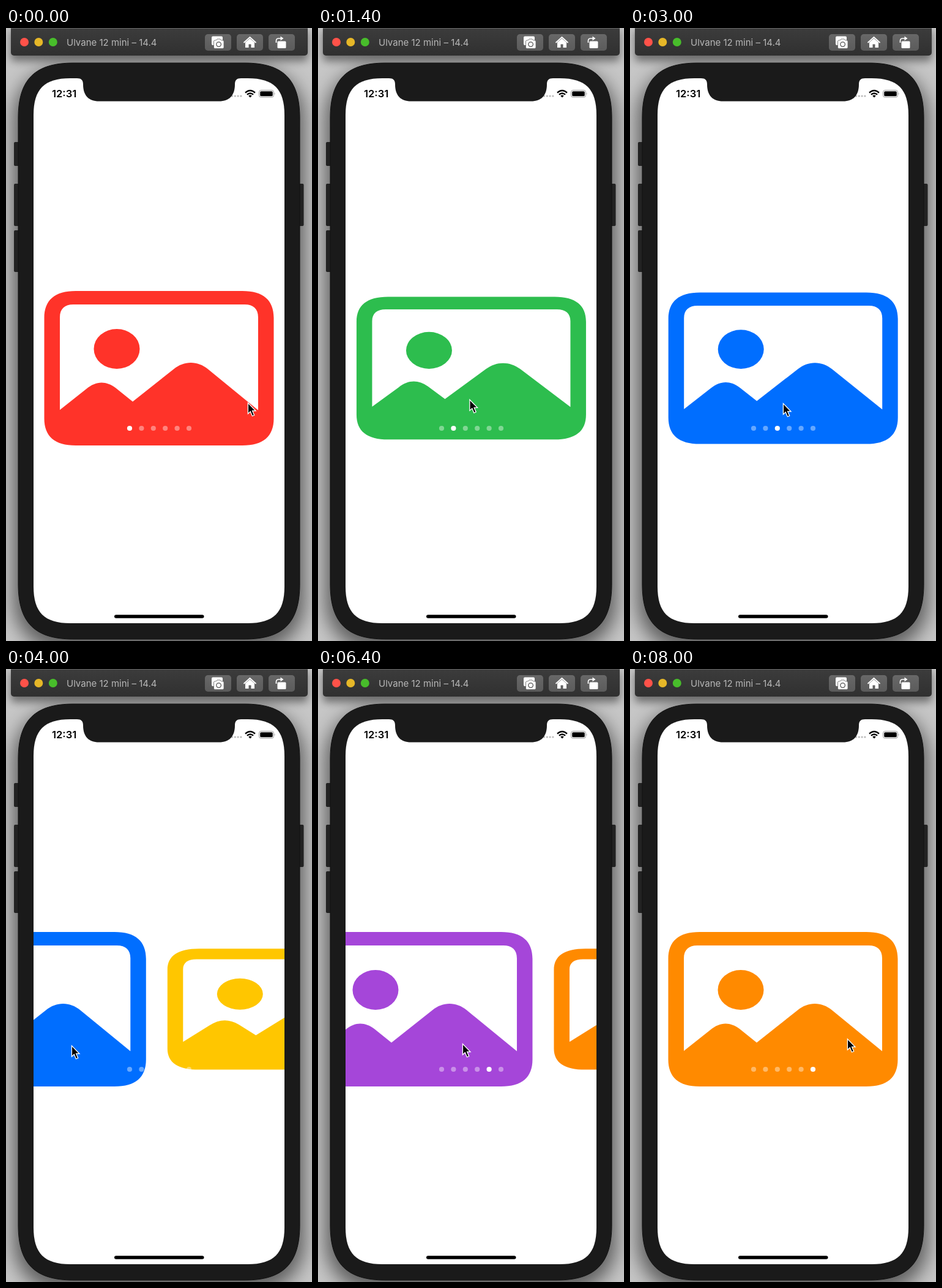
Animation, 500 px wide and 1000 px high, one loop 8200 ms. Source, as an HTML page:

```html
<!DOCTYPE html>
<html lang="en">
<head>
<meta charset="utf-8">
<title>Page carousel</title>
<style>
  html, body { margin: 0; width: 100%; height: 100%; overflow: hidden; background: #bebebe; }
  svg { display: block; width: 100vw; height: 100vh; }
  text { font-family: Inter, Roboto, sans-serif; }
</style>
</head>
<body>
<svg viewBox="0 0 500 1000" preserveAspectRatio="none">
  <defs>
    <linearGradient id="bar" x2="0" y2="1">
      <stop stop-color="#3e3e3e"/><stop offset="1" stop-color="#303030"/>
    </linearGradient>
    <linearGradient id="key" x2="0" y2="1">
      <stop stop-color="#686868"/><stop offset="1" stop-color="#5b5b5b"/>
    </linearGradient>
    <filter id="blur" x="-20%" y="-20%" width="140%" height="140%"><feGaussianBlur stdDeviation="15"/></filter>
    <filter id="soft" x="-20%" y="-60%" width="140%" height="220%"><feGaussianBlur stdDeviation="7"/></filter>
    <clipPath id="screen"><path d="M45 142C45 99.600 62.600 82 105 82H395C437.400 82 455 99.600 455 142V911C455 953.400 437.400 971 395 971H105C62.600 971 45 953.400 45 911Z"/></clipPath>
    <path id="picture" fill-rule="evenodd" d="M62.500 473C62.500 444 79.500 429 114 429H386C420.500 429 437.500 444 437.500 473V637C437.500 666 420.500 681 386 681H114C79.500 681 62.500 666 62.500 637Z
      M88 623L131 589C147 575.500 163 575 179 587L207 609.500L274 556.500C291 542.500 313 542.500 330 556.500L412 623.500V472C412 458 404 451 390 451H110C96 451 88 458 88 472Z
      M143.500 523.500a37.500 32.500 0 1 0 75 0a37.500 32.500 0 1 0 -75 0Z"/>
  </defs>

  <rect width="500" height="1000" fill="#c6c6c6"/>
  <rect x="12" y="66" width="476" height="950" rx="80" fill="#000" opacity=".52" filter="url(#blur)"/>
  <rect x="8" y="4" width="485" height="50" rx="6" fill="#000" opacity=".45" filter="url(#soft)"/>

  <!-- simulator toolbar -->
  <rect x="8" y="-8" width="485" height="53" rx="5" fill="url(#bar)"/>
  <path d="M8 .5H493" stroke="#666"/>
  <circle cx="30" cy="23" r="7" fill="#ff5249"/>
  <circle cx="53.300" cy="23" r="7" fill="#e6b728"/>
  <circle cx="76.800" cy="23" r="7" fill="#48bd2b"/>
  <text x="99" y="29" font-size="15" fill="#b7b7b7">Ulvane 12 mini – 14.4</text>
  <g fill="url(#key)">
    <rect x="325" y="10" width="43" height="27" rx="5"/>
    <rect x="377" y="10" width="43" height="27" rx="5"/>
    <rect x="429" y="10" width="43" height="27" rx="5"/>
  </g>
  <g fill="#fff">
    <path d="M336 15.500q0-2 2-2h14q2 0 2 2V20H341v8h-3q-2 0-2-2Z"/>
    <path d="M339.500 22q0-2 2-2h2l1.500-2h5l1.500 2h2.500q2 0 2 2v9.500q0 2-2 2h-12.500q-2 0-2-2Z" stroke="#626262" stroke-width=".8"/>
    <circle cx="347.600" cy="26.600" r="3.800" fill="none" stroke="#555" stroke-width="1.300"/>
    <path d="M391 23.500V32h5.500v-5.500h4V32h5.500v-8.500L398.500 17Z"/>
    <path d="M388.500 24L398.500 15L408.500 24" fill="none" stroke="#fff" stroke-width="1.700"/>
    <rect x="443.500" y="21.500" width="14" height="11.500" rx="1.500"/>
    <path d="M441.500 24v-3q0-4 4-4h4" fill="none" stroke="#fff" stroke-width="1.700"/>
    <path d="M448.500 13.500L453.500 17L448.500 20.500Z"/>
  </g>

  <!-- phone body -->
  <g fill="#222">
    <rect x="13" y="186" width="9" height="39" rx="2"/>
    <rect x="13" y="254" width="9" height="69" rx="2"/>
    <rect x="13" y="330" width="9" height="68" rx="2"/>
    <rect x="477" y="254" width="9.500" height="69" rx="2"/>
  </g>
  <path fill="#1a1a1a" stroke="#111" d="M20 147C20 84 47 57 110 57H390C453 57 480 84 480 147V907C480 970 453 997 390 997H110C47 997 20 970 20 907Z"/>

  <g clip-path="url(#screen)">
    <rect x="45" y="82" width="410" height="889" fill="#fff"/>
    <g id="pages"></g>
    <g id="dots" fill="#fff"></g>
    <text x="75" y="113" font-size="16.600" font-weight="600">12:31</text>
    <path d="M369.500 111H384.500" stroke="#b9b9b9" stroke-width="3.200" stroke-linecap="round" stroke-dasharray="0 4.800"/>
    <g fill="none" stroke="#000" stroke-width="2.300">
      <path d="M391 105.600Q399 98.500 407 105.600"/>
      <path d="M393.900 108.700Q399 104.200 404.100 108.700"/>
    </g>
    <path d="M396.200 110.600Q399 108.200 401.800 110.600L399 113.400Z"/>
    <rect x="413.500" y="101.500" width="24" height="11.500" rx="3.300" fill="none" stroke="#999"/>
    <rect x="415.200" y="103.200" width="20.600" height="8.100" rx="1.900"/>
    <path d="M438.800 105.500q1.800 1.700 0 3.500Z" fill="#999"/>
    <rect x="177" y="957.200" width="146.500" height="5.600" rx="2.800"/>
  </g>
  <path fill="#1a1a1a" d="M116 80V82C123 82 126 85 126 92C126 110 135 119.500 152 119.500H348C365 119.500 374 110 374 92C374 85 377 82 384 82V80Z"/>
  <path id="cursor" stroke="#fff" stroke-width="1.300" d="M.4.6V18.300L4.300 14.700L7.400 22L10.700 20.700L7.600 13.500H13Z"/>
</svg>
<script>
const LOOP = 8200, STEP = 200, PAGE_WIDTH = 410, SMALL = 0.783, MIDDLE = 554.7;
const COLORS = ['#ff3329', '#2dbd4e', '#006eff', '#ffc600', '#a546d9', '#ff8a00'];
const SWIPE_STARTS = [400, 1946, 3661, 4996, 6199];
const SETTLE = 850, GROW = 250;

// Pointer path: time, x, y
const POINTER = [
  [0, 395, 611], [400, 360, 606], [800, 97, 598], [1200, 200, 604], [1750, 358, 610],
  [1950, 355, 610], [2200, 223, 611], [2450, 80, 612], [3000, 250, 612], [3500, 325, 614],
  [3660, 318, 614], [4000, 107, 614], [4150, 70, 616], [4700, 320, 620], [5000, 330, 620],
  [5200, 243, 618], [5450, 80, 612], [6000, 320, 610], [6200, 322, 611], [6400, 236, 611],
  [6650, 75, 606], [7300, 340, 602], [8000, 355, 603]
];

const byId = id => document.getElementById(id);
const clamp = v => Math.max(0, Math.min(1, v));
const smooth = v => v * v * (3 - 2 * v);
const mix = (a, b, v) => a + (b - a) * v;

function add(parent, tag, attrs) {
  const node = document.createElementNS('http://www.w3.org/2000/svg', tag);
  for (const name in attrs) node.setAttribute(name, attrs[name]);
  return parent.appendChild(node);
}

const pages = COLORS.map(fill => add(byId('pages'), 'use', { href: '#picture', fill }));
const dots = COLORS.map((_, i) => add(byId('dots'), 'circle', { cx: 202 + 19.4 * i, cy: 653, r: 4.1 }));

// Drag that speeds up, then glides into place
const swipe = age => age <= 0 ? 0 : age > 1200 ? 1 : 1 - Math.exp(-Math.pow(age / 399, 2.09));

// How far a page's selection has taken effect, 0 to 1
const chosen = (page, t) => page === 0 ? 1
  : page > SWIPE_STARTS.length ? 0
  : smooth(clamp((t - SWIPE_STARTS[page - 1] - SETTLE) / GROW));

function pointerAt(t) {
  const i = POINTER.findIndex(point => point[0] > t);
  if (i < 0) return POINTER[POINTER.length - 1].slice(1);
  const [t0, x0, y0] = POINTER[i - 1], [t1, x1, y1] = POINTER[i];
  const v = smooth((t - t0) / (t1 - t0));
  return [mix(x0, x1, v), mix(y0, y1, v)];
}

function draw(t) {
  const position = SWIPE_STARTS.reduce((sum, start) => sum + swipe(t - start), 0);
  const selected = SWIPE_STARTS.filter(start => t >= start + SETTLE).length;
  pages.forEach((page, i) => {
    const scale = mix(SMALL, 1, chosen(i, t) - chosen(i + 1, t));
    page.setAttribute('transform',
      `translate(${(i - position) * PAGE_WIDTH} ${MIDDLE * (1 - scale)}) scale(1 ${scale})`);
  });
  dots.forEach((dot, i) => dot.setAttribute('opacity', i === selected ? 1 : 0.4));
  byId('cursor').setAttribute('transform', `translate(${pointerAt(t).join(' ')})`);
}

const began = performance.now();
function frame() {
  const t = (performance.now() - began) % LOOP;
  draw(Math.floor(t / STEP) * STEP);
  requestAnimationFrame(frame);
}
draw(0);
requestAnimationFrame(frame);
</script>
</body>
</html>
```
